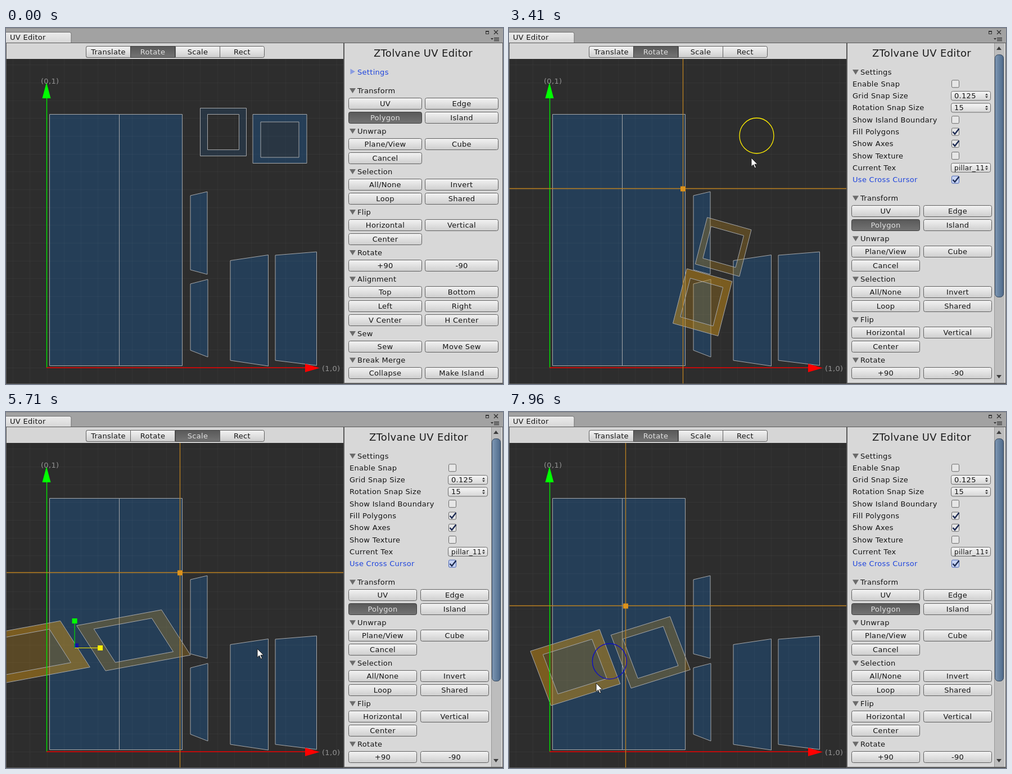
Write an HTML page with a canvas that moves like this. It is 884 by 633 pixels and loops after 7990 ms.

```html
<!DOCTYPE html>
<html lang="en">
<head>
<meta charset="utf-8">
<title>UV Editor</title>
<style>
html, body { margin: 0; width: 100%; height: 100%; overflow: hidden; background: #a2a2a2; }
canvas { display: block; }
</style>
</head>
<body>
<canvas id="stage" width="884" height="633"></canvas>
<script>
const ctx = document.getElementById('stage').getContext('2d');
const LOOP = 7990;
const FONT = '"DejaVu Sans", Verdana, sans-serif';
const TAU = Math.PI * 2;
const RAD = Math.PI / 180;
const ASPECT = 1.047;              // height of one UV unit relative to its width
const PIVOT = [309, 285];
const EDGE = '#a6a8aa';
const YELLOW = '#ffee00';

const EXPAND = 360, CROSS_ON = 860, PICK1 = 2440, PICK2 = 2580;
const TURN = 2780, TURN_END = 4500, SCALE_ON = 4850, ROTATE_ON = 7640;

// [time, x, y]
const pointer = [
  [60, 900, 160], [300, 650, 74], [420, 650, 74], [780, 796, 266], [880, 796, 266],
  [1650, 217, 386], [1770, 216, 386], [1910, 216, 386], [2250, 310, 287], [2300, 310, 287],
  [2430, 352, 190], [2460, 352, 190], [2570, 446, 200], [2600, 446, 200], [2750, 471, 191],
  [TURN, 471, 191], [4350, 391, 211], [4500, 391, 211], [4800, 340, 44], [4870, 340, 44],
  [5270, 260, 421], [5330, 258, 421], [5470, 258, 421], [5710, 447, 421], [6080, 329, 421],
  [6120, 329, 421], [6250, 180, 373], [6300, 180, 373], [6560, 180, 338], [6620, 180, 338],
  [6920, 309, 282], [7040, 309, 282], [7350, 207, 342], [7400, 207, 342], [7620, 260, 44],
  [7680, 260, 44], [7940, 155, 482]
];
// [time, angle, radius] around the turning gizmo
const orbit = [
  [TURN, 0, 31], [2900, -21, 110], [3410, 102.7, 41], [3500, 150, 45],
  [3850, 362, 60], [4260, 151.3, 48], [4350, 158, 53]
];
const turn = [[TURN, 0], [2900, -21], [3410, 105], [3500, 153], [3850, 364], [4260, 174], [4350, 161]];
const stretchX = [[5470, 1], [5710, 1.947], [6080, 1.356]];
const stretchY = [[6300, 1], [6560, 1.177]];
const crossPath = [[1910, 215, 384], [2250, 309, 285], [7040, 309, 285], [7350, 207, 344]];

const box = (x0, y0, x1, y1) => [[x0, y0], [x1, y0], [x1, y1], [x0, y1]];
const fixedShapes = [
  box(77.5, 153.5, 201.5, 600.5),
  box(201.5, 153.5, 313.5, 600.5),
  [[328, 298], [358, 291], [358, 438], [328, 430]],
  [[328, 455], [359, 447], [359, 585], [328, 573]],
  [[399, 413.5], [466.5, 403.5], [466.5, 601], [399, 591]],
  [[479, 404], [552.5, 398], [552.5, 600], [479, 591]]
];
const frames = [
  { outer: box(345.5, 142.5, 427.5, 227.5), inner: box(358.5, 153.5, 414.5, 216.5), solid: false },
  { outer: box(439, 153.5, 535, 240.5), inner: box(453, 167, 521, 230), solid: true }
];

const settings = [
  ['Enable Snap', false], ['Grid Snap Size', '0.125'], ['Rotation Snap Size', '15'],
  ['Show Island Boundary', false], ['Fill Polygons', true], ['Show Axes', true],
  ['Show Texture', false], ['Current Tex', 'pillar_11'], ['Use Cross Cursor', null]
];
const sections = [
  ['Transform', 'UV', 'Edge', 'Polygon', 'Island'],
  ['Unwrap', 'Plane/View', 'Cube', 'Cancel', ''],
  ['Selection', 'All/None', 'Invert', 'Loop', 'Shared'],
  ['Flip', 'Horizontal', 'Vertical', 'Center', ''],
  ['Rotate', '+90', '-90'],
  ['Alignment', 'Top', 'Bottom', 'Left', 'Right', 'V Center', 'H Center'],
  ['Sew', 'Sew', 'Move Sew'],
  ['Break Merge', 'Collapse', 'Make Island']
];

// Monotone cubic through the keys, column c
function track(keys, t, c = 1) {
  const last = keys.length - 1;
  if (t <= keys[0][0]) return keys[0][c];
  if (t >= keys[last][0]) return keys[last][c];
  let i = 0;
  while (t >= keys[i + 1][0]) i++;
  const slope = k => k < 0 || k >= last ? 0 : (keys[k + 1][c] - keys[k][c]) / (keys[k + 1][0] - keys[k][0]);
  const tangent = k => {
    const a = slope(k - 1), b = slope(k);
    return a * b <= 0 ? 0 : 2 * a * b / (a + b);
  };
  const h = keys[i + 1][0] - keys[i][0];
  const u = (t - keys[i][0]) / h, u2 = u * u, u3 = u2 * u;
  return keys[i][c] * (2 * u3 - 3 * u2 + 1) + keys[i + 1][c] * (3 * u2 - 2 * u3)
    + h * (tangent(i) * (u3 - 2 * u2 + u) + tangent(i + 1) * (u3 - u2));
}

function rect(x, y, w, h, color) {
  ctx.fillStyle = color;
  ctx.fillRect(x, y, w, h);
}

function line(x0, y0, x1, y1, color, width = 1) {
  ctx.strokeStyle = color;
  ctx.lineWidth = width;
  ctx.beginPath();
  ctx.moveTo(x0, y0);
  ctx.lineTo(x1, y1);
  ctx.stroke();
}

function addPath(pts) {
  pts.forEach(([x, y], i) => i ? ctx.lineTo(x, y) : ctx.moveTo(x, y));
  ctx.closePath();
}

function poly(pts, fill, stroke) {
  ctx.beginPath();
  addPath(pts);
  if (fill) { ctx.fillStyle = fill; ctx.fill(); }
  if (stroke) { ctx.strokeStyle = stroke; ctx.lineWidth = 1; ctx.stroke(); }
}

function text(str, x, y, { color = '#141414', size = 13, align = 'left' } = {}) {
  ctx.font = size + 'px ' + FONT;
  ctx.letterSpacing = '0.3px';
  ctx.textAlign = align;
  ctx.textBaseline = 'alphabetic';
  ctx.fillStyle = color;
  ctx.fillText(str, x, y);
}

function shade(y, h, top, bottom) {
  const g = ctx.createLinearGradient(0, y, 0, y + h);
  g.addColorStop(0, top);
  g.addColorStop(1, bottom);
  return g;
}

function panelBox(x, y, w, h, r, fill, stroke) {
  ctx.beginPath();
  ctx.roundRect(x, y, w, h, r);
  ctx.fillStyle = fill;
  ctx.fill();
  ctx.strokeStyle = stroke;
  ctx.lineWidth = 1;
  ctx.stroke();
}

function button(label, x, y, w, h, on, r = 3) {
  const fill = on ? shade(y, h, '#585858', '#747474') : shade(y, h, '#f4f4f4', '#cdcdcd');
  panelBox(x + 0.5, y + 0.5, w - 1, h - 1, r, fill, on ? '#3e3e3e' : '#5f5f5f');
  text(label, x + w / 2, y + h / 2 + 4.5, { color: on ? '#e2e2e2' : '#141414', align: 'center' });
}

function drawWindow(mode) {
  rect(0, 0, 884, 633, '#a2a2a2');
  rect(0, 0, 884, 1, '#8a8a8a');
  panelBox(-3.5, 7.5, 119.5, 24, 3, shade(7, 20, '#ececec', '#d6d6d6'), '#6f6f6f');
  text('UV Editor', 7, 21);
  rect(0, 26, 884, 607, '#595959');
  rect(1, 27, 599, 28, '#d6d6d6');
  rect(602, 27, 281, 604, '#d8d8d8');

  ctx.strokeStyle = '#333';
  ctx.lineWidth = 1;
  ctx.strokeRect(853.5, 5.5, 5, 5);
  rect(853, 5, 6, 2, '#333');
  line(868, 4, 875, 11, '#333', 1.4);
  line(875, 4, 868, 11, '#333', 1.4);
  poly([[862, 18], [867, 18], [864.5, 21]], '#333');
  for (let i = 0; i < 3; i++) rect(868, 17 + i * 2.5, 9, 1.2, '#333');

  panelBox(142.5, 32.5, 316, 20, 3, '#ddd', '#555');
  ['Translate', 'Rotate', 'Scale', 'Rect'].forEach((name, i) => {
    const r = i === 0 ? [3, 0, 0, 3] : i === 3 ? [0, 3, 3, 0] : 0;
    button(name, 142 + Math.round(i * 79.3), 32, 80, 21, name === mode, r);
  });
}

function foldout(name, y, open, color = '#141414') {
  const pts = open ? [[611, y - 4], [622, y - 4], [616.5, y + 5]] : [[612.5, y - 5.5], [621, y - 0.5], [612.5, y + 4.5]];
  poly(pts, color === '#141414' ? '#6b6b6b' : '#8a9ce0');
  text(name, 625, y + 4.5, { color });
}

function checkbox(y, on, active) {
  panelBox(787.5, y - 6.5, 13, 13, 2, active ? '#c6d3f2' : '#e6e6e6', active ? '#4a66b5' : '#6a6a6a');
  if (!on) return;
  ctx.strokeStyle = '#1c2a52';
  ctx.lineWidth = 2.4;
  ctx.beginPath();
  ctx.moveTo(789.5, y);
  ctx.lineTo(793, y + 4);
  ctx.lineTo(800.5, y - 5.5);
  ctx.stroke();
}

function dropdown(value, y) {
  panelBox(786.5, y - 8, 70, 16, 3, shade(y - 8, 16, '#f6f6f6', '#d6d6d6'), '#6a6a6a');
  text(value, 792, y + 4.5, { size: value.length > 6 ? 12 : 13 });
  poly([[847, y - 1], [852, y - 1], [849.5, y - 4]], '#333');
  poly([[847, y + 1], [852, y + 1], [849.5, y + 4]], '#333');
}

function drawPanel(t) {
  const open = t >= EXPAND, crossOn = t >= CROSS_ON;
  const blue = '#1f45dd';
  ctx.save();
  ctx.beginPath();
  ctx.rect(602, 27, 281, 604);
  ctx.clip();
  text('ZTolvane UV Editor', open ? 734 : 742, 51, { size: 18, align: 'center', color: '#1c1c1c' });
  foldout('Settings', 78, open, crossOn ? '#141414' : blue);
  if (open) settings.forEach(([name, value], i) => {
    const y = 99.3 + i * 21.3;
    const active = value === null && crossOn;
    text(name, 611, y + 4.5, { color: active ? blue : '#141414' });
    if (typeof value === 'string') dropdown(value, y);
    else checkbox(y, value || active, active);
  });

  const w = open ? 122 : 131, step = open ? 127.5 : 135.5;
  let y = open ? 302.3 : 111;
  for (const [name, ...items] of sections) {
    foldout(name, y, true);
    y += 23.6;
    items.forEach((label, i) => {
      if (i && i % 2 === 0) y += 24.7;
      if (label) button(label, Math.round(609 + (i % 2) * step), Math.round(y - 10.5), w, 21, label === 'Polygon');
    });
    y += 23.7;
  }

  if (open) {
    rect(863, 27, 18, 604, '#bdbdbd');
    line(863.5, 27, 863.5, 631, '#989898');
    const g = ctx.createLinearGradient(864, 0, 880, 0);
    g.addColorStop(0, '#8199b6');
    g.addColorStop(0.5, '#65819f');
    g.addColorStop(1, '#4d6788');
    panelBox(864.5, 47.5, 15, 431, 6, g, '#34465c');
    poly([[867, 39], [876, 39], [871.5, 33]], '#3c3c3c');
    poly([[867, 617], [876, 617], [871.5, 623]], '#3c3c3c');
  }
  ctx.restore();
}

function drawFrame(frame, move, picked) {
  const tint = (strong) => picked
    ? `rgba(200,140,20,${strong ? 0.5 : 0.28})`
    : `rgba(30,80,130,${strong ? 0.5 : 0.25})`;
  const outer = frame.outer.map(move), inner = frame.inner.map(move);
  ctx.beginPath();
  addPath(outer);
  addPath(inner);
  ctx.fillStyle = tint(frame.solid);
  ctx.fill('evenodd');
  poly(inner, frame.solid ? tint(false) : null, EDGE);
  poly(outer, null, EDGE);
}

function handle(x, y, color, size = 9) {
  rect(x - size / 2, y - size / 2, size, size, color);
}

function drawGizmo(t, sx, sy) {
  if (t < PICK1) return;
  const done = t >= TURN_END;
  const x = done ? PIVOT[0] + (213 - PIVOT[0]) * sx : t < PICK2 ? 386.5 : 440.5;
  const y = done ? PIVOT[1] + (419.5 - PIVOT[1]) * sy : t < PICK2 ? 185 : 191.5;
  if (t >= SCALE_ON && t < ROTATE_ON) {
    const pullX = t >= 5330 && t < 6100, pullY = t >= 6280 && t < 6590;
    handle(x + 3, y - 4, '#1212a8', 8);
    line(x, y, x + 45, y, pullX ? YELLOW : '#9c2318', 1.2);
    line(x, y, x, y - 48, pullY ? YELLOW : '#00e000', 1.2);
    handle(x + 45.5, y, pullX ? YELLOW : '#ff0000');
    handle(x, y - 48, pullY ? YELLOW : '#00ff00');
  } else {
    ctx.strokeStyle = t >= TURN && !done ? YELLOW : '#0a0acb';
    ctx.lineWidth = 1.3;
    ctx.beginPath();
    ctx.ellipse(x, y, 30.5, 31.5, 0, 0, TAU);
    ctx.stroke();
  }
}

function drawCanvas(t) {
  ctx.save();
  ctx.beginPath();
  ctx.rect(1, 55, 599, 577);
  ctx.clip();
  rect(0, 55, 600, 578, '#2d2d2d');

  fixedShapes.forEach(s => poly(s, 'rgba(30,80,130,0.5)'));
  for (let x = 72.5 - 60.6; x < 600; x += 30.3) line(Math.round(x) + 0.5, 55, Math.round(x) + 0.5, 633, 'rgba(255,255,255,0.03)');
  for (let y = 604 + 31.7 * 0; y > 55; y -= 31.7) line(0, Math.round(y) + 0.5, 600, Math.round(y) + 0.5, 'rgba(255,255,255,0.03)');
  fixedShapes.forEach(s => poly(s, null, EDGE));

  const a = track(turn, t) * RAD, cos = Math.cos(a), sin = Math.sin(a);
  const sx = track(stretchX, t), sy = track(stretchY, t);
  const move = ([px, py]) => {
    const x = px - PIVOT[0], y = (py - PIVOT[1]) / ASPECT;
    return [PIVOT[0] + sx * (x * cos - y * sin), PIVOT[1] + sy * ASPECT * (x * sin + y * cos)];
  };
  drawFrame(frames[0], move, t >= PICK1);
  drawFrame(frames[1], move, t >= PICK2);

  line(72.5, 604, 72.5, 120, '#00e400', 1.4);
  line(72, 604, 535, 604, '#f00000', 1.6);
  poly([[72, 97], [79.5, 125], [64.5, 125]], '#00ff00');
  poly([[558, 604.5], [532, 612], [532, 597]], '#ff0000');
  text('(0,1)', 62, 99, { color: '#929292' });
  text('(1,0)', 562, 610, { color: '#929292' });

  if (t >= CROSS_ON) {
    const x = track(crossPath, t), y = track(crossPath, t, 2);
    line(0, y + 0.5, 600, y + 0.5, '#bd8120', 1.3);
    line(x + 0.5, 55, x + 0.5, 633, '#bd8120', 1.3);
    handle(x + 0.5, y + 1, '#dc921c');
  }
  drawGizmo(t, sx, sy);
  ctx.restore();
}

function drawPointer(t) {
  if (t < 60) return;
  let x = track(pointer, t), y = track(pointer, t, 2);
  if (t >= TURN && t < 4350) {
    const a = track(orbit, t) * RAD, r = track(orbit, t, 2);
    x = 440 + r * Math.cos(a);
    y = 191 + r * Math.sin(a);
  }
  ctx.save();
  ctx.translate(x, y);
  poly([[0, 0], [0, 15.5], [3.6, 12], [6.2, 18], [8.6, 17], [6, 11.2], [11, 11.2]], '#fff', '#1a1a1a');
  ctx.restore();
}

function draw(now) {
  const t = now % LOOP;
  drawWindow(t >= SCALE_ON && t < ROTATE_ON ? 'Scale' : 'Rotate');
  drawCanvas(t);
  drawPanel(t);
  drawPointer(t);
}

let start = null;
function tick(now) {
  if (start === null) start = now;
  draw(now - start);
  requestAnimationFrame(tick);
}
draw(0);
requestAnimationFrame(tick);
</script>
</body>
</html>
```
